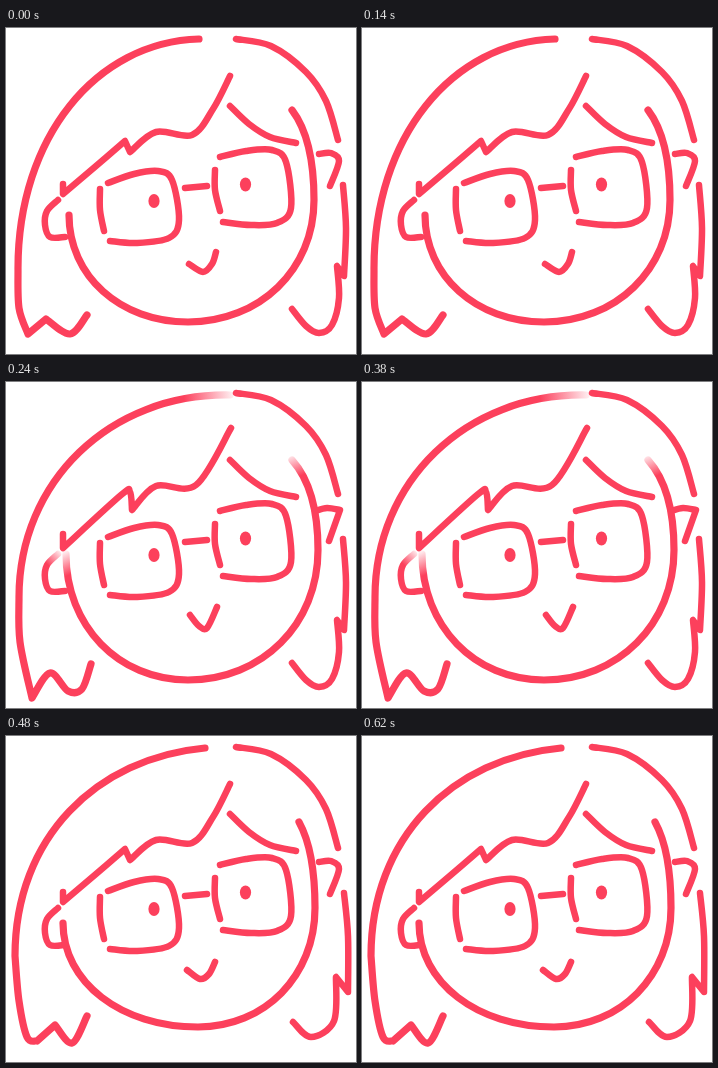
Animation of 350 by 326 pixels, one loop 720 ms. Source, as an HTML page:

```html
<!DOCTYPE html>
<html lang="en">
<head>
<meta charset="utf-8">
<title>Wobbly portrait</title>
<style>
html, body { margin: 0; width: 100%; height: 100%; overflow: hidden; background: #fff; }
svg { display: block; width: 350px; height: 326px; }
path { fill: none; stroke: #fc405c; stroke-width: 6.5; stroke-linecap: round; stroke-linejoin: round; }
path.bold { stroke-width: 7.2; }
ellipse { fill: #fc405c; }
</style>
</head>
<body>
<svg id="stage" viewBox="0 0 350 326"><defs></defs></svg>
<script>
const NS = "http://www.w3.org/2000/svg";
const stage = document.getElementById("stage");
const STEP = 240;
const INK = "#fc405c";
const ROUNDNESS = 0.57;

// Strokes every pose shares. "/" makes the point before it a sharp corner.
const features = {
  hairRight: "230,11 265,18 300,44 320,73 332,112",
  fringe: "224,48 207,81 186,107 150,104 124,124 / 119,113 / 90,138 57,166 / 57,156",
  sideFringe: "224,78 243,96 264,109 290,115",
  earLeft: "52,172 41,183 39,197 44,209 59,209",
  earRight: "313,126 325,125 333,133 324,158",
  lock: "337,157 340,200 338,248 / 331,238 / 333,270 326,297 313,305 300,298 286,281",
  lensLeft: "102,155 128,146 152,143 166,152 173,192 163,210 130,215 104,213",
  lensRight: "214,129 240,123 266,122 280,134 285,180 271,195 245,197 217,194",
  rimLeft: "94,161 94,182 98,203",
  rimRight: "209,142 209,162 214,183",
  bridge: "179,160 201,158"
};
const eyes = [[148, 173], [239.5, 156.5]];

// Landmarks of the hair and face outlines, plus the strokes a pose redraws.
const poses = [
  {
    crown: [193, 11], tilt: 3, side: [12, 240],
    tips: "13,280 22,306 / 40,291 / 64,306 81,287",
    temple: [63, 187], chin: [182, 294], cheek: [308, 172], brow: [286, 82],
    redraw: { mouth: "183,236 197,244 206,236 210,224" }
  },
  {
    crown: [224, 13], tilt: -2, side: [13, 215],
    tips: "14,260 26,316 / 44,291 62,309 76,307 85,282",
    temple: [60, 172], chin: [182, 298], cheek: [312, 168], brow: [286, 78],
    redraw: {
      mouth: "184,233 193,244 201,246 211,225",
      fringe: "225,46 190,103 150,104 126,128 / 124,110 115,113 57,166 / 57,152",
      earRight: "309,129 321,126 334,128 / 323,159"
    },
    // Soft stroke ends: from clear point to solid point.
    fades: { hairLeft: [226, 13, 178, 18], face: [285, 73, 294, 94], earLeft: [55, 170, 42, 183] }
  },
  {
    crown: [199, 12], tilt: 10, side: [9, 220],
    tips: "13,265 21,301 31,305 / 49,289 / 66,307 81,280",
    temple: [57, 187], chin: [192, 291], cheek: [309, 172], brow: [293, 86],
    redraw: {
      mouth: "181,234 194,243 203,238 209,226",
      lock: "338,157 342,200 342,256 / 330,241 / 328,285 305,301 287,286"
    }
  }
];

function add(parent, tag, attrs) {
  const node = document.createElementNS(NS, tag);
  for (const key in attrs) node.setAttribute(key, attrs[key]);
  return parent.appendChild(node);
}

const mix = (a, b, t) => a + (b - a) * t;

// Catmull-Rom spline through the points as cubic Béziers.
function spline(points) {
  let d = "";
  for (let i = 0; i < points.length - 1; i++) {
    const p1 = points[i], p2 = points[i + 1];
    const p0 = points[i - 1] || p1, p3 = points[i + 2] || p2;
    const c1 = p1.map((v, k) => v + (p2[k] - p0[k]) / 6);
    const c2 = p2.map((v, k) => v - (p3[k] - p1[k]) / 6);
    d += `C${c1} ${c2} ${p2}`;
  }
  return d;
}

function strokePath(text, last = null) {
  let d = "";
  for (const run of text.split(" / ")) {
    const points = run.split(" ").map(pair => pair.split(",").map(Number));
    if (last) points.unshift(last);
    else d = "M" + points[0];
    d += spline(points);
    last = points[points.length - 1];
  }
  return d;
}

// Quarter ovals between a level end and an upright end.
function levelToUpright([x1, y1], [x2, y2], tilt = 0) {
  return `C${mix(x1, x2, ROUNDNESS)},${y1 + tilt} ${x2},${mix(y2, y1, ROUNDNESS)} ${x2},${y2}`;
}

function uprightToLevel([x1, y1], [x2, y2]) {
  return `C${x1},${mix(y1, y2, ROUNDNESS)} ${mix(x2, x1, ROUNDNESS)},${y2} ${x2},${y2}`;
}

const hairPath = ({ crown, side, tilt, tips }) =>
  `M${crown}` + levelToUpright(crown, side, tilt) + strokePath(tips, side);

const facePath = ({ temple, chin, cheek, brow }) =>
  `M${temple}` + uprightToLevel(temple, chin) + levelToUpright(chin, cheek) +
  `Q${cheek[0]},${brow[1] + 29} ${brow}`;

function fadeStroke(id, [x1, y1, x2, y2]) {
  const gradient = add(stage.querySelector("defs"), "linearGradient",
    { id, x1, y1, x2, y2, gradientUnits: "userSpaceOnUse" });
  add(gradient, "stop", { offset: 0, "stop-color": INK, "stop-opacity": 0.1 });
  add(gradient, "stop", { offset: 1, "stop-color": INK });
  return `url(#${id})`;
}

function buildPose(pose) {
  const group = add(stage, "g", {});
  const fades = pose.fades || {};
  const addStroke = (name, d, weight) => {
    const path = add(group, "path", { d, class: weight });
    if (fades[name]) path.style.stroke = fadeStroke("fade-" + name, fades[name]);
  };
  addStroke("hairLeft", hairPath(pose), "bold");
  addStroke("face", facePath(pose), "bold");
  const strokes = { ...features, ...pose.redraw };
  for (const name in strokes) addStroke(name, strokePath(strokes[name]), "fine");
  for (const [cx, cy] of eyes) add(group, "ellipse", { cx, cy, rx: 5.6, ry: 7 });
  return group;
}

const groups = poses.map(buildPose);

function draw(time) {
  const current = Math.floor(time / STEP) % poses.length;
  groups.forEach((group, i) => group.setAttribute("display", i === current ? "inline" : "none"));
}

const start = performance.now();
function tick() {
  draw(performance.now() - start);
  requestAnimationFrame(tick);
}
tick();
</script>
</body>
</html>
```
